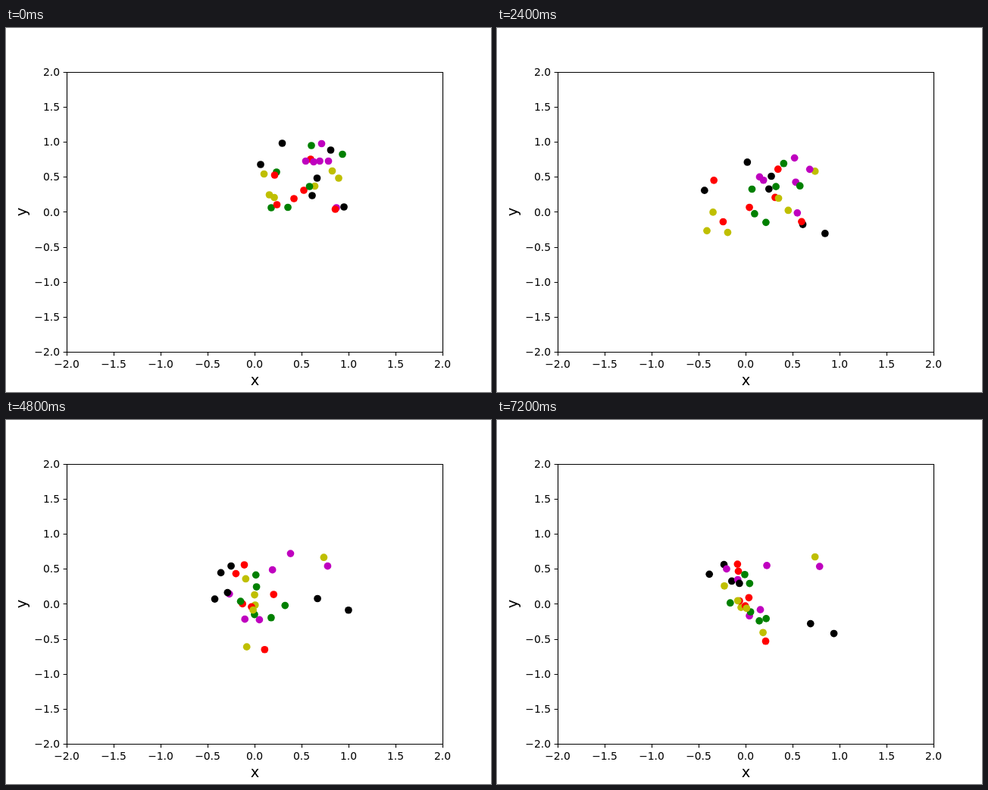
An HTML page for the animation above (8 s loop, 640 by 480 pixels).

```html
<!DOCTYPE html>
<html lang="en">
<head>
<meta charset="utf-8">
<title>Swarm</title>
<style>
  html, body { margin: 0; width: 100%; height: 100%; overflow: hidden; background: #fff; }
  svg { display: block; width: 640px; height: 480px; }
  text { font-family: "DejaVu Sans", sans-serif; font-size: 13.89px; }
  .name { font-size: 19.44px; text-anchor: middle; }
  .frame { fill: none; stroke: #000; stroke-width: 1.11; }
</style>
</head>
<body>
<svg id="plot" viewBox="0 0 640 480"></svg>
<script>
const STEP = 800, STEPS = 10;
const LEFT = 80, TOP = 57.6, WIDTH = 496, HEIGHT = 369.6;
const svg = document.getElementById('plot');

// Axis 0 is x, axis 1 is y; plot units run from -2 to 2.
const toUnit = (px, axis) => axis ? 2 - (px - TOP) * 4 / HEIGHT : (px - LEFT) * 4 / WIDTH - 2;
const toPixel = (u, axis) => axis ? TOP + (2 - u) * HEIGHT / 4 : LEFT + (u + 2) * WIDTH / 4;

function add(tag, attrs, label) {
  const el = document.createElementNS('http://www.w3.org/2000/svg', tag);
  for (const key in attrs) el.setAttribute(key, attrs[key]);
  if (label) el.textContent = label;
  return svg.appendChild(el);
}

// Starting conditions: x, y and first move dx, dy of each particle, in pixels.
const swarms = {
  '#bfbf00': [
    [430.5, 188.5, 21.5, -4.5], [407.5, 208.5, 54.5, -24.5], [340.5, 192.5, 76, -73.5],
    [439, 198, 83, -62], [347.5, 220, 97.5, -67], [354, 223.5, 69, -65]
  ],
  '#ff0000': [
    [393, 214, 39.5, -15], [380, 225, 67.5, -17], [402, 173, 47.5, -23.5],
    [354.5, 194, 95, -13], [357.5, 233, 82.5, -31.5], [434.5, 239, 52, -22.5]
  ],
  '#bf00bf': [
    [436, 237, 62, -9.5], [425.5, 175.5, 49.5, -43.5], [406, 176.5, 87, -32.5],
    [395.5, 175.5, 64.5, -40], [414, 175.5, 7, -20], [416.5, 152.5, 38.5, -33]
  ],
  '#000000': [
    [336, 180, 85, -52], [364.5, 152, 48.5, -41.5], [428.5, 161, 98.5, -54],
    [410.5, 198, 76.5, -23], [404, 221, 5, -54], [446, 236, 26, -48.5]
  ],
  '#008000': [
    [357, 190, 29, -35], [350, 237, 14, -11], [372, 236.5, 25.5, -27.5],
    [400.5, 209, 49, -2.5], [403, 155, 38.5, -39.5], [444, 166.5, 69, -63.5]
  ]
};

const cost = ([x, y]) => 2 * x * x + y * y;
const better = (a, b) => cost(a) < cost(b) ? a : b;

// Particles are drawn in layers, one of each colour per layer.
const particles = [];
for (let layer = 0; layer < 6; layer++) {
  for (const [fill, rows] of Object.entries(swarms)) {
    const [x, y, dx, dy] = rows[layer];
    const from = [x, y].map(toUnit), to = [x + dx, y + dy].map(toUnit);
    particles.push({
      el: add('circle', { r: 4.86, fill }), path: [from, to], best: better(to, from)
    });
  }
}

// Particle swarm: inertia, pull to the own best, growing push off the shared best.
function fly() {
  const pull = 1.56;
  for (let n = 1; n < STEPS - 1; n++) {
    const inertia = n < 4 ? 0.8 : 0.6;
    const push = 0.01 + 0.02 * n;
    const shared = particles.map(p => p.best).reduce(better);
    for (const p of particles) {
      const now = p.path[n], last = p.path[n - 1];
      const next = now.map((u, i) => u + inertia * (u - last[i])
        + pull * (p.best[i] - u) + push * (u - shared[i]));
      p.path.push(next);
      p.best = better(next, p.best);
    }
  }
}

function drawAxes() {
  const snap = v => Math.floor(v + 0.5) + 0.5;
  const bottom = snap(TOP + HEIGHT), left = snap(LEFT);
  let path = `M${left} ${snap(TOP)}H${snap(LEFT + WIDTH)}V${bottom}H${left}Z`;
  for (let u = -2; u <= 2; u += 0.5) {
    const label = (u < 0 ? '\u2212' : '') + Math.abs(u).toFixed(1);
    const x = toPixel(u, 0), y = toPixel(u, 1);
    path += `M${snap(x)} ${bottom}v4.86M${left} ${snap(y)}h-4.86`;
    add('text', { x, y: 448, 'text-anchor': 'middle' }, label);
    add('text', { x: 71, y: Math.round(y + 5.2), 'text-anchor': 'end' }, label);
  }
  add('path', { class: 'frame', d: path });
  add('text', { class: 'name', x: 328.5, y: 471 }, 'x');
  add('text', { class: 'name', transform: 'translate(27 242.4) rotate(-90)' }, 'y');
}

fly();
drawAxes();

let shown = -1;
const begin = performance.now();
function tick() {
  const step = Math.floor((performance.now() - begin) / STEP) % STEPS;
  if (step !== shown) {
    shown = step;
    for (const { el, path } of particles) {
      const [x, y] = path[step].map(toPixel);
      el.setAttribute('cx', x.toFixed(2));
      el.setAttribute('cy', y.toFixed(2));
    }
  }
  requestAnimationFrame(tick);
}
tick();
</script>
</body>
</html>
```
